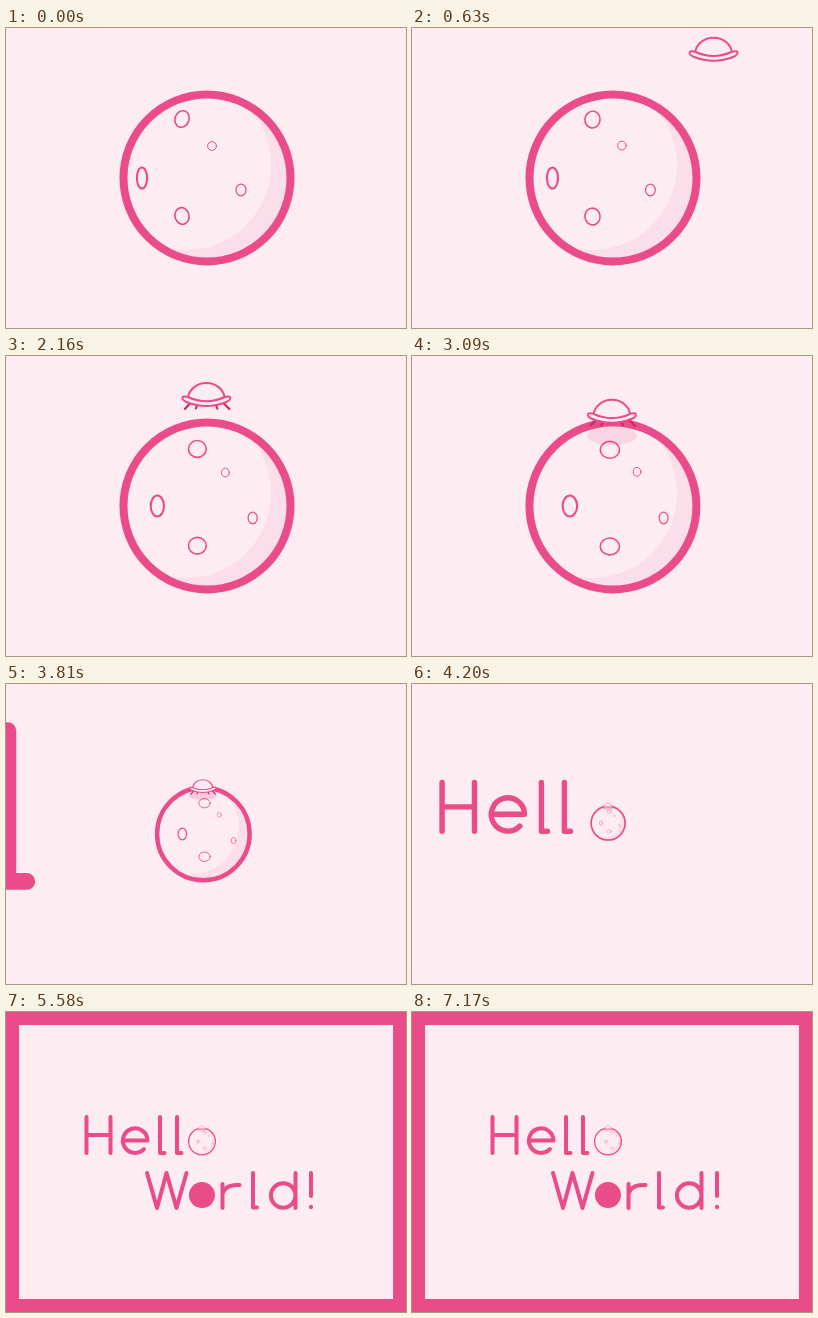
An HTML page that plays this animation: 400x300 px, repeating every 7.2 s.

```html
<!DOCTYPE html>
<html lang="en">
<head>
<meta charset="utf-8">
<title>Hello World!</title>
<style>
  html, body { margin: 0; width: 100%; height: 100%; overflow: hidden; background: #fdecf2; }
  svg { display: block; width: 100vw; height: 100vh; }
  .line { fill: none; stroke: #ea4c89; stroke-linecap: round; stroke-linejoin: round; }
  .body { fill: #fdecf2; stroke: #ea4c89; }
</style>
</head>
<body>
<svg viewBox="0 0 400 300" role="img" aria-label="Hello World!">
  <defs>
    <clipPath id="disc"><circle cx="201" cy="150" r="83.5"/></clipPath>
  </defs>
  <rect width="400" height="300" fill="#fdecf2"/>

  <g id="planet">
    <g clip-path="url(#disc)">
      <circle cx="201" cy="150" r="84" fill="#fadfea"/>
      <circle cx="180" cy="137" r="85" fill="#fdecf2"/>
      <ellipse id="shadow" cx="200" cy="80" rx="25" ry="9" fill="#f6cbdc"/>
      <g id="craters"></g>
    </g>
    <circle class="line" cx="201" cy="150" r="83.5" stroke-width="8"/>
    <g id="ufo" stroke-width="2">
      <path id="legs" d="M-16 8L-21.5 14M-9 9L-10.5 13.5M9 9L11 13.5M17 8L23 14"
        fill="none" stroke="#c92a68" stroke-width="2.2" stroke-linecap="round"/>
      <path class="body" d="M-18.5 4C-18 -5 -10 -12 0 -12S18 -5 18.5 4Q0 11 -18.5 4Z"/>
      <path class="body" stroke-linejoin="round"
        d="M-18.5 2C-25 0 -26 4 -20 7Q0 15 20 7C26 4 25 0 18.5 2Q0 10.5 -18.5 2Z"/>
    </g>
  </g>

  <g id="hello" class="line" stroke-width="4">
    <path d="M80.5 105V141M104.5 105V141M80.5 123H104.5"/>
    <path d="M117 128.5H141.5A12.3 12.3 0 1 0 138 137.2"/>
    <path d="M154 105V141H158.5M171 105V141H175.5"/>
  </g>

  <g id="world" class="line" stroke-width="4"></g>
  <circle id="ball" r="13" fill="#ea4c89"/>
  <rect id="frame" x="0" y="0" width="400" height="300" fill="none" stroke="#ea4c89"/>
</svg>
<script>
const LOOP = 7200;
const $ = id => document.getElementById(id);
const set = (el, attrs) => { for (const k in attrs) el.setAttribute(k, attrs[k]); };
const make = (tag, parent, attrs) => {
  const el = document.createElementNS('http://www.w3.org/2000/svg', tag);
  set(el, attrs);
  return parent.appendChild(el);
};
const span = (t, a, b) => Math.min(1, Math.max(0, (t - a) / (b - a)));
const mix = (a, b, p) => a + (b - a) * p;
const inOut = p => p < .5 ? 4 * p ** 3 : 1 - 4 * (1 - p) ** 3;
const sine = p => (1 - Math.cos(Math.PI * p)) / 2;
const out = p => 1 - (1 - p) ** 3;
const show = (el, on) => el.setAttribute('visibility', on ? 'visible' : 'hidden');

// start x, y, radii, then change per second, tilt and line width
const craters = [
  { x: 176, y: 91, rx: 7, ry: 8.4, vx: 7.1, vy: .9, vr: .85, tilt: 20, w: 1.6 },
  { x: 136, y: 150, rx: 5.1, ry: 10.5, vx: 7.1, vy: 0, vr: .7, tilt: 0, w: 2.1 },
  { x: 176, y: 188, rx: 7, ry: 8.4, vx: 7.1, vy: .8, vr: .85, tilt: -15, w: 1.6 },
  { x: 206, y: 118, rx: 4.4, ry: 4.4, vx: 6.2, vy: -.7, vr: -.2, tilt: 0, w: 1 },
  { x: 235, y: 162, rx: 5, ry: 5.8, vx: 5.4, vy: 0, vr: -.2, tilt: 0, w: 1.2 }
].map(c => ({ ...c, el: make('ellipse', $('craters'), { class: 'line', 'stroke-width': c.w }) }));

const letters = [
  { at: 4620, x: 161, d: 'M141 161L151 196L160.5 161L170.5 196L180.5 161' },
  { at: 4960, x: 224, d: 'M216.5 172V196M216.5 182Q219 172 233.5 173' },
  { at: 5050, x: 249, d: 'M247 161V195.5H251' },
  { at: 5140, x: 277, d: 'M289.5 161V196M289.5 183.5A12.3 12.3 0 1 0 264.9 183.5A12.3 12.3 0 1 0 289.5 183.5' },
  { at: 5230, x: 305, d: 'M305 161V184M305 194.7V195.3' }
].map(l => ({ ...l, el: make('path', $('world'), { d: l.d }) }));

// time, x, y
const flight = [
  [0, 440, -22], [765, 276, 29], [1200, 224.5, 36], [1500, 226.5, 37], [2160, 200.4, 39], [2460, 200, 39.5]
];

function follow(t, keys) {
  const last = keys.length - 1;
  if (t >= keys[last][0]) return keys[last].slice(1);
  const i = keys.findIndex(k => k[0] > t) - 1;
  const a = keys[i], b = keys[i + 1], h = b[0] - a[0], u = (t - a[0]) / h;
  const slope = (j, c) => {
    if (j === last) return 0;
    const p = keys[Math.max(0, j - 1)], n = keys[j + 1];
    return (n[c] - p[c]) / (n[0] - p[0]);
  };
  return [1, 2].map(c =>
    mix(a[c], b[c], u * u * (3 - 2 * u)) +
    h * u * (1 - u) * ((1 - u) * slope(i, c) - u * slope(i + 1, c)));
}

function drawPlanet(t, zoom) {
  const x = mix(201, 196, Math.sqrt(zoom));
  const y = mix(150, 129.5, sine(span(t, 3810, 4560)));
  const s = mix(1, .16, zoom);
  set($('planet'), { transform: `translate(${x} ${y}) scale(${s}) translate(-201 -150)` });

  const sec = t / 1000;
  for (const c of craters) {
    const cx = c.x + c.vx * sec, cy = c.y + c.vy * Math.min(sec, 4);
    set(c.el, {
      cx, cy, rx: c.rx + c.vr * Math.min(sec, 4), ry: c.ry,
      transform: `rotate(${c.tilt * (1 - span(t, 0, 1200))} ${cx} ${cy})`
    });
  }

  const [ux, uy] = follow(t, flight);
  const land = sine(span(t, 2460, 3500));
  set($('ufo'), { transform: `translate(${ux} ${uy + 24.5 * land})` });
  const leg = sine(span(t, 1700, 2100));
  set($('legs'), { transform: `translate(0 ${-6 * (1 - leg)}) scale(${mix(.7, 1, leg)} 1)` });
  show($('legs'), leg > 0);
  set($('shadow'), { opacity: land });
}

function drawBall(t) {
  const ball = $('ball'), d = Math.min(t, 4942) - 4500;
  show(ball, t >= 4380);
  const x = 359.5 - .37 * d, y = 26 + .000804 * d * d;
  let sx = .92, sy = .74, turn = -18;
  if (t >= 4942) {
    const p = span(t, 4942, 5240), k = .12 * (1 - p) ** 2 * Math.cos(p * 9);
    sx = 1 + k; sy = 1 - k; turn = 0;
  }
  set(ball, { transform: `translate(${x} ${y}) rotate(${turn}) scale(${sx} ${sy})` });
}

function draw(t) {
  const zoom = inOut(span(t, 3030, 4560));
  drawPlanet(t, zoom);

  const k = mix(7.8, 1, zoom);
  set($('hello'), { transform: `translate(224 123.3) scale(${k}) translate(-224 -123.3)` });
  show($('hello'), t >= 3700);

  for (const l of letters) {
    const p = out(span(t, l.at, l.at + 200));
    show(l.el, p > 0);
    set(l.el, { transform: `translate(${l.x} 179) scale(${p}) translate(${-l.x} -179)` });
  }
  drawBall(t);

  const edge = 13 * out(span(t, 5100, 5600));
  show($('frame'), edge > 0);
  set($('frame'), { 'stroke-width': 2 * edge });
}

const start = performance.now();
function tick(now) {
  draw(Math.max(0, now - start) % LOOP);
  requestAnimationFrame(tick);
}
draw(0);
requestAnimationFrame(tick);
</script>
</body>
</html>
```
